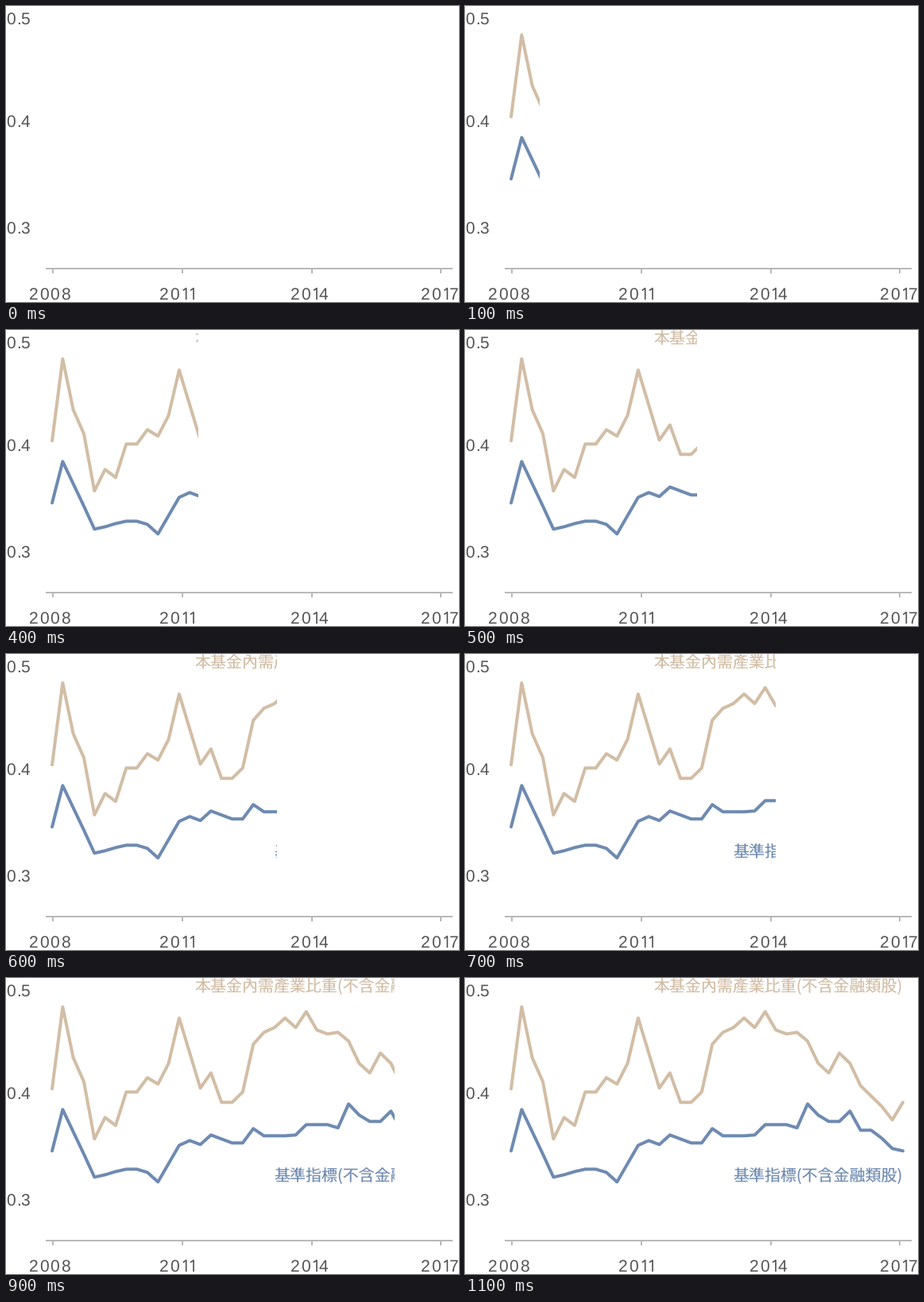
Animation of 570x372 px, one loop 1.2 s. Source, as a matplotlib script:

```python
import matplotlib.pyplot as plt
import numpy as np
from matplotlib.animation import FuncAnimation
from matplotlib.patches import Rectangle

W, H, DPI = 570, 372, 100
PX = 72 / DPI  # points per pixel
FRAMES, INTERVAL = 12, 100
TAN, BLUE, GREY, INK = "#d2bda5", "#6e8ab1", "#b9b9b9", "#555555"

plt.rcParams["text.hinting"] = "none"
plt.rcParams["text.hinting_factor"] = 8

# Heights in pixels, one per quarter; the quarters are evenly spaced.
fund = [139, 36, 100, 130, 202, 175, 185, 143, 143, 125, 133, 107, 50,
        94, 138, 119, 156, 156, 143, 83, 68, 62, 50, 62, 42, 65, 70, 68,
        79, 107, 119, 94, 107, 135, 148, 161, 178, 156]
bench = [217, 165, 193, 221, 250, 247, 243, 240, 240, 244, 256, 233, 210,
         204, 209, 197, 202, 207, 207, 189, 198, 198, 198, 197, 184, 184,
         184, 188, 158, 172, 180, 180, 167, 191, 191, 201, 214, 217]

fig = plt.figure(figsize=(W / 100, H / 100), dpi=DPI, facecolor="white")
ax = fig.add_axes([0, 0, 1, 1])
ax.set_xlim(0, W)
ax.set_ylim(H, 0)
ax.axis("off")


def stroke(xs, ys, color, width, cap="butt", z=4):
    ax.plot(xs, ys, color=color, lw=width * PX, solid_capstyle=cap,
            solid_joinstyle="round", zorder=z)


def series(heights, color):
    xs = np.linspace(58, 551, len(heights))
    stroke(xs, np.array(heights) + 0.3, color, 4, "round", z=1)


def label(x, y, text):
    """Widely tracked digits with a plain, footless one."""
    for ch in text:
        if ch == "1":
            stroke([x + 3, x + 7, x + 7], [y - 11.6, y - 14.2, y], INK, 1.7)
        else:
            ax.text(x, y, ch, family="Liberation Sans", size=21 * PX,
                    color=INK, va="baseline", zorder=4)
        x += {"1": 9.3, ".": 5.4}.get(ch, 13.2)


def caption(x, y, text, color):
    ax.text(x, y, text, family="Noto Sans CJK JP", size=20 * PX,
            color=color, va="baseline", zorder=1)


series(fund, TAN)
series(bench, BLUE)
caption(237.5, 17.4, "本基金內需產業比重(不含金融類股)", TAN)
caption(337.5, 255.4, "基準指標(不含金融類股)", BLUE)

stroke([50, 562], [330, 330], GREY, 2)
for i in range(4):
    tick = 59 + 162.8 * i
    stroke([tick, tick], [330, 336], GREY, 2)
    label(29 + 164.3 * i, 369, str(2008 + 3 * i))
for y, text in ((23, "0.5"), (152, "0.4"), (286, "0.3")):
    label(0, y, text)

# A white cover slides right and reveals the chart.
cover = ax.add_patch(Rectangle((0, -2), W, 272, fc="white", lw=0, zorder=3))


def draw(i):
    cover.set_x(44.7 + 49.4 * i)
    return [cover]


anim = FuncAnimation(fig, draw, frames=FRAMES, interval=INTERVAL,
                     repeat=True, repeat_delay=0, blit=False)
plt.show()
```
